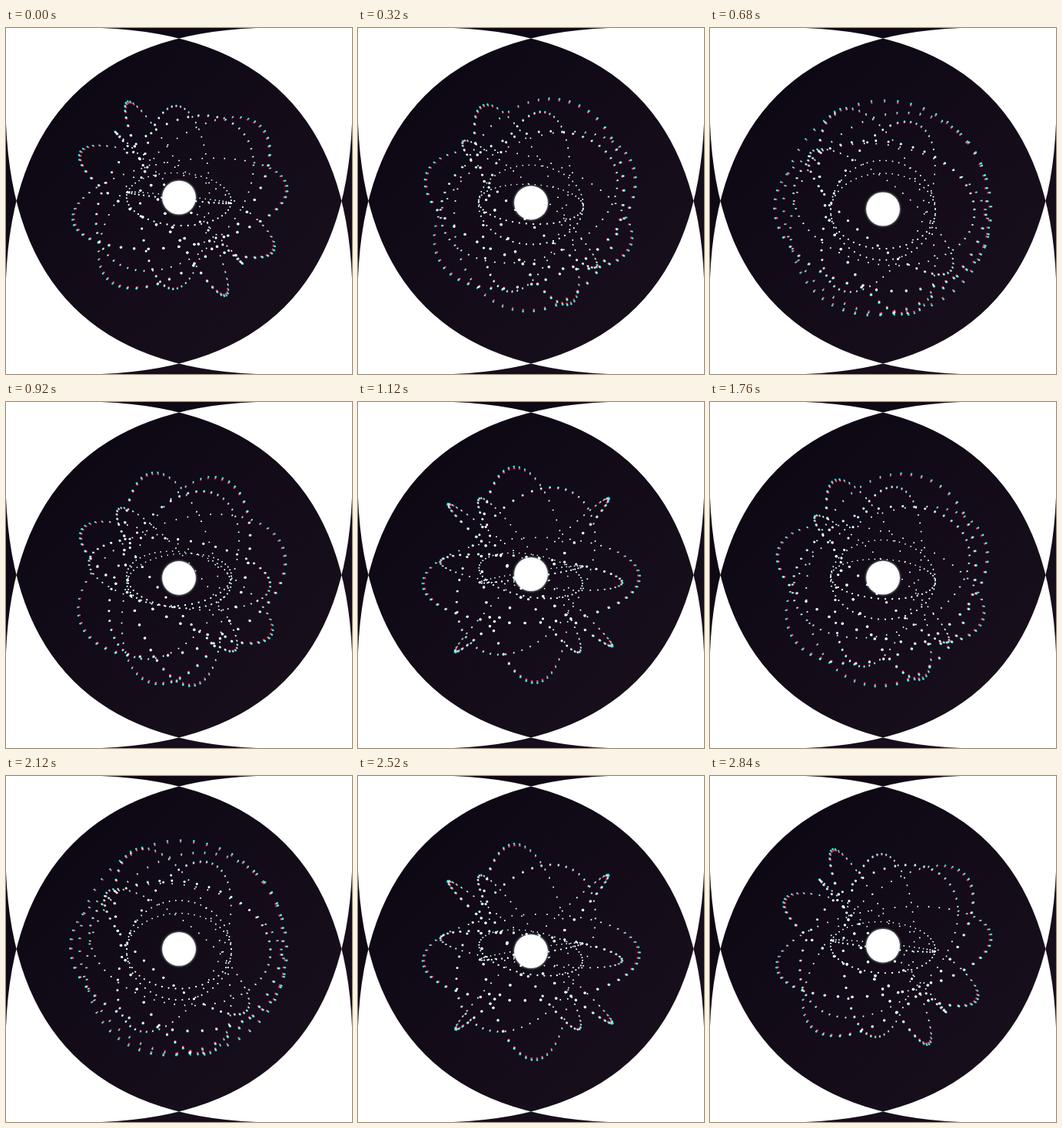
Recreate the animation shown at these times as an HTML page with a canvas. Size 450 by 450 pixels, loop 2880 ms.

```html
<!DOCTYPE html>
<html>
<head>
<meta charset="utf-8">
<style>
  html, body { margin: 0; height: 100%; overflow: hidden; background: #fff; }
  canvas { display: block; width: 100vw; height: 100vh; }
</style>
</head>
<body>
<canvas id="stage" width="450" height="450"></canvas>
<script>
const ctx = document.getElementById('stage').getContext('2d');
const SIZE = 450, MID = SIZE / 2;
const LOOP = 2880, TURN = LOOP / 2;
const CAMERA = 900, DOTS = 50;
const TAU = Math.PI * 2, DEG = Math.PI / 180;

// Heights the ball drifts between: time, y
const drift = [[0, 220.5], [680, 235.5], [1120, 224], [1440, 231.5],
               [2120, 225], [2520, 228]];

// Each shell fans its rings out evenly. A pose holds, in degrees:
// time, heading of the first ring, heading step, first tilt, tilt step, extra tilt of odd rings
const shells = [
  { radius: 139, count: 4, poses: [[0, -45, 36, 30, -7, 0], [680, -110, 60, 74, -16, 0], [1100, -45, 43, 4, 0, 19]] },
  { radius: 118, count: 3, poses: [[0, 46, 45, 1, 21, 0], [680, 40, 75, 18, 12, 0], [1100, 57, 65, 9, 0, 31]] },
  { radius: 68, count: 2, poses: [[0, 3, 3, 30, -28, 0], [680, 0, 0, 72, -26, 0], [1100, -9, 19, 3, 21, 0]] }
];

// Values at time t on a closed cycle of keys, eased from each key to the next
function valuesAt(keys, period, t) {
  const i = keys.findLastIndex(key => key[0] <= t);
  const [from, ...a] = keys[i];
  const [next, ...b] = keys[(i + 1) % keys.length];
  const f = (t - from) / ((next || period) - from);
  const ease = (1 - Math.cos(Math.PI * f)) / 2;
  return a.map((v, k) => v + (b[k] - v) * ease);
}

function disc(x, y, r, color) {
  ctx.fillStyle = color;
  ctx.beginPath();
  ctx.arc(x, y, r, 0, TAU);
  ctx.fill();
}

// Colours split further apart away from the centre.
function drawDot(x, y, size, cy) {
  const split = .0075 * (x * x + y * y) / 140 ** 2;
  disc(MID + x * (1 - split), cy + y * (1 - split), size, '#ff3b45');
  disc(MID + x * (1 + split), cy + y * (1 + split), size, '#00ffe0');
}

function drawRing(radius, heading, tilt, cy) {
  const c = Math.cos(heading), s = Math.sin(heading);
  for (let i = 0; i < DOTS; i++) {
    const a = i / DOTS * TAU;
    const u = radius * Math.cos(a), v = radius * Math.sin(a);
    const near = CAMERA / (CAMERA - v * Math.cos(tilt));
    const w = v * Math.sin(tilt);
    drawDot((u * c - w * s) * near, (u * s + w * c) * near,
            (.65 + radius / 250) * near ** 2.5, cy);
  }
}

function drawShell({ radius, count, poses }, t, cy) {
  const [heading, fan, tilt, rise, odd] = valuesAt(poses, TURN, t);
  for (let j = 0; j < count; j++) {
    drawRing(radius, (heading + fan * j) * DEG, (tilt + rise * j + odd * (j % 2)) * DEG, cy);
  }
}

// White parabolic corners; where two overlap, the backdrop shows again.
function drawCorners() {
  const corners = new Path2D();
  for (const x of [0, SIZE]) {
    for (const y of [0, SIZE]) {
      const inX = d => Math.abs(x - d), inY = d => Math.abs(y - d);
      corners.moveTo(x, y);
      corners.lineTo(x, inY(326));
      corners.quadraticCurveTo(inX(12), inY(12), inX(326), y);
      corners.closePath();
    }
  }
  ctx.fillStyle = '#fff';
  ctx.fill(corners, 'evenodd');
}

const backdrop = ctx.createLinearGradient(60, 60, 390, 390);
backdrop.addColorStop(0, '#0d0714');
backdrop.addColorStop(1, '#190f1c');

function draw(t) {
  const [y] = valuesAt(drift, LOOP, t);
  ctx.fillStyle = backdrop;
  ctx.fillRect(0, 0, SIZE, SIZE);
  drawCorners();

  ctx.globalCompositeOperation = 'lighter';
  for (const shell of shells) drawShell(shell, t % TURN, y);
  ctx.globalCompositeOperation = 'source-over';

  ctx.shadowColor = '#d8ffe8';
  ctx.shadowBlur = 3;
  disc(MID, y, 21.8, '#fff');
  ctx.shadowBlur = 0;
}

const start = performance.now();
function tick() {
  draw((performance.now() - start) % LOOP);
  requestAnimationFrame(tick);
}
tick();
</script>
</body>
</html>
```
